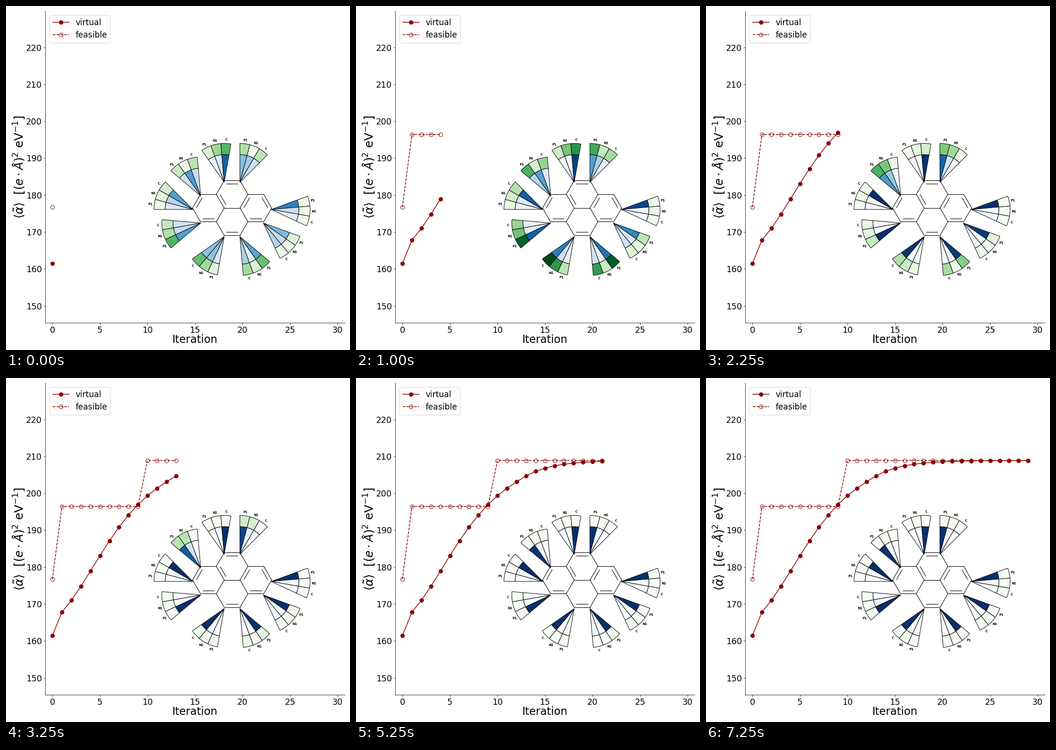
Animation, 720 px wide and 720 px high, one loop 7.5 s. Source, as a matplotlib script:

```python
import numpy as np
import matplotlib.pyplot as plt
from matplotlib.animation import FuncAnimation
from matplotlib.patches import Wedge

SIZE = 720
STEPS = 30
SETTLED = 20          # the fans rest after this iteration
RED = "darkred"
BLUES, GREENS = plt.get_cmap("Blues"), plt.get_cmap("Greens")
plt.rcParams["font.family"] = "DejaVu Sans"

# Curves: a smooth rise through five points, then a geometric approach
START, TOP = 161.45, 208.87
KNOTS, GAPS = [1, 4, 7, 10, 13], [41.07, 29.94, 18.07, 9.54, 4.19]
steps = np.arange(STEPS)
gap = np.polyval(np.polyfit(KNOTS, GAPS, 4), np.minimum(steps, KNOTS[-1]))
gap *= 0.702 ** np.maximum(steps - KNOTS[-1], 0)
virtual = np.where(steps == 0, START, TOP - gap)
feasible = np.select([steps < 1, steps < 10], [176.72, 196.42], TOP)

# Molecule geometry in pixels, y pointing up
CX, CY, BOND = 473.25, 297.2, 33.1
APO = BOND * np.sqrt(3) / 2
TOP_RING, BOTTOM_RING = (CX, CY + APO), (CX, CY - APO)
LEFT_RING, RIGHT_RING = (CX - 1.5 * BOND, CY), (CX + 1.5 * BOND, CY)
DOUBLE_BONDS = [(TOP_RING, 90), (TOP_RING, 210), (BOTTOM_RING, 270),
                (LEFT_RING, 150), (LEFT_RING, 270),
                (RIGHT_RING, 30), (RIGHT_RING, 150), (RIGHT_RING, 270)]

# Fans sit on the outer atoms of a slightly smaller, lower lattice
FAN_X, FAN_Y, FAN_BOND = 473.1, 294.2, 32.8
R_IN, R_OUT, R_TEXT = 58, 81.4, 89.4
SECTOR = 15
NAMES = ["P1", "N1", "C"]
MIN_FADE = 0.12
# atom column and row, first angle, starting shares of P1 and N1,
# winning sector, fading speed of its rival, strength of the green
FANS = [
    (0.5, 2, 90, 0.43, 0.37, "P1", 0.048, 5),
    (-0.5, 2, 125, 0.06, 0.13, "C", 0.15, 7.5),
    (-2, 1, 140, 0.20, 0.57, "P1", 0.055, 5),
    (-2.5, 0, 180, 0.14, 0.30, "C", 0.16, 2),
    (-2, -1, 220, 0.57, 0.24, "P1", 0.155, 6),
    (-0.5, -2, 260, 0.17, 0.41, "C", 0.15, 5.6),
    (0.5, -2, 320, 0.55, 0.11, "P1", 0.10, 6.5),
    (2, -1, 340, 0.45, 0.24, "P1", 0.11, 1.8),
    (2.5, 0, 20, 0.68, 0.23, "P1", 0.20, 0.7),
]


def polar(origin, r, deg):
    a = np.radians(deg)
    return np.array([origin[0] + r * np.cos(a), origin[1] + r * np.sin(a)])


class Fan:
    def __init__(self, ax, col, row, first, p1, n1, winner, speed, gain):
        self.start = np.array([p1, n1, 1 - p1 - n1])
        self.gain = gain
        lead = NAMES.index(winner)
        rival = max((k for k in range(3) if k != lead), key=lambda k: self.start[k])
        self.fade = np.full(3, max(speed, MIN_FADE))
        self.fade[rival] = speed
        self.fade[lead] = 0

        tip = (FAN_X + col * FAN_BOND, FAN_Y + row * FAN_BOND * np.sqrt(3) / 2)
        edge = dict(edgecolor="black", linewidth=1, zorder=3)
        self.inner, self.outer = [], []
        for k, name in enumerate(NAMES):
            hi = first - SECTOR * k
            lo = hi - SECTOR
            self.inner.append(ax.add_patch(Wedge(tip, R_IN, lo, hi, **edge)))
            self.outer.append(ax.add_patch(
                Wedge(tip, R_OUT, lo, hi, width=R_OUT - R_IN, **edge)))
            ax.text(*polar(tip, R_TEXT, (lo + hi) / 2), name, fontsize=6.5,
                    weight="bold", ha="center", va="center_baseline")

    def update(self, t):
        """Blue is a sector's share, green is how hard that share is changing."""
        share = self.start * np.exp(-self.fade * t ** 1.5)
        share /= share.sum()
        push = np.abs(share * (self.fade - share @ self.fade))
        level = np.interp(t, [0, 4, 9, SETTLED], [0.5, 1, 1, 0.1])
        green = self.gain * level * push / np.sqrt(push.max())
        for k in range(3):
            self.inner[k].set_facecolor(BLUES(float(share[k])))
            self.outer[k].set_facecolor(GREENS(float(min(green[k], 1))))


fig = plt.figure(figsize=(SIZE / 72, SIZE / 72), dpi=72, facecolor="white")

# Chart: axes box in pixels, limits from the pixel scale of each axis
LEFT, RIGHT, BOTTOM, UPPER = 82.3, 709.2, 56.6, 709.8
ax = fig.add_axes([LEFT / SIZE, BOTTOM / SIZE,
                   (RIGHT - LEFT) / SIZE, (UPPER - BOTTOM) / SIZE])
ax.set_xlim((LEFT - 97.1) / 19.9, (RIGHT - 97.1) / 19.9)
ax.set_ylim(150 + (BOTTOM - 92.26) / 7.7315, 150 + (UPPER - 92.26) / 7.7315)
ax.set_xticks(range(0, 31, 5))
ax.set_yticks(range(150, 221, 10))
ax.tick_params(labelsize=17.5)
ax.spines[["top", "right"]].set_visible(False)
ax.set_xlabel("Iteration", fontsize=22.5, labelpad=-1.5)
ax.set_ylabel(r"$\langle \tilde{\alpha} \rangle$  [$(e \cdot \AA)^2$ eV$^{-1}$]",
              fontsize=24.5, labelpad=0)
style = dict(color=RED, marker="o", markersize=8, linewidth=1.5)
solid, = ax.plot([], [], "-", label="virtual", **style)
dashed, = ax.plot([], [], "--", label="feasible", markerfacecolor="none", **style)
ax.legend(loc="upper left", fontsize=17)

# Molecule
mol = fig.add_axes([0, 0, 1, 1])
mol.set_xlim(0, SIZE)
mol.set_ylim(0, SIZE)
mol.axis("off")


def bond(a, b):
    mol.plot([a[0], b[0]], [a[1], b[1]], color="black", linewidth=1.1)


drawn = set()
for ring in (TOP_RING, BOTTOM_RING, LEFT_RING, RIGHT_RING):
    for angle in range(0, 360, 60):
        middle = tuple(np.round(polar(ring, APO, angle + 30)))
        if middle not in drawn:       # neighbouring rings share a side
            drawn.add(middle)
            bond(polar(ring, BOND, angle), polar(ring, BOND, angle + 60))
for ring, side in DOUBLE_BONDS:
    middle = polar(ring, APO - 6.7, side)
    bond(polar(middle, 11.8, side + 90), polar(middle, 11.8, side - 90))

fans = [Fan(mol, *row) for row in FANS]


def draw(i):
    n = i + 1
    solid.set_data(steps[:n], virtual[:n])
    dashed.set_data(steps[:n], feasible[:n])
    for fan in fans:
        fan.update(min(i, SETTLED))
    return [solid, dashed]


anim = FuncAnimation(fig, draw, frames=STEPS, interval=250,
                     init_func=lambda: draw(0), repeat=True, repeat_delay=0)
plt.show()
```
